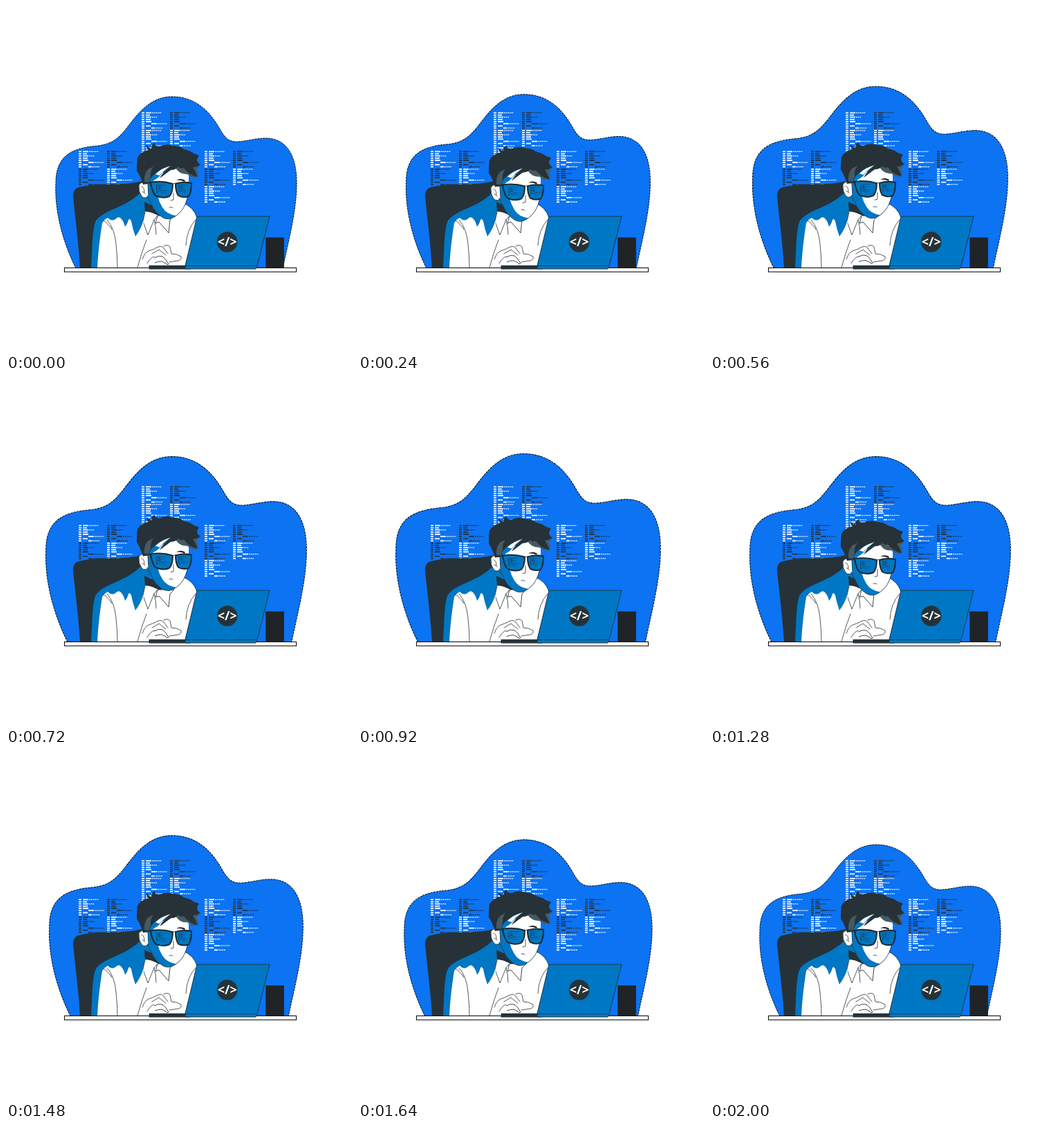
An HTML page for the animation above (2.04 s loop, 500 by 500 pixels).

```html
<!DOCTYPE html>
<html lang="en">
<head>
<meta charset="utf-8">
<title>Developer at work</title>
<style>
html, body { margin: 0; width: 100%; height: 100%; overflow: hidden; background: #fff; }
svg { display: block; width: 100%; height: 100%; }
.dark { fill: #263238; }
.grey { fill: #455a64; }
.blue { fill: #0077c4; }
.white { fill: #fff; }
.line { fill: none; stroke: #263238; stroke-width: .8; stroke-linecap: round; stroke-linejoin: round; }
.edge { stroke: #263238; stroke-width: .9; stroke-linejoin: round; }
.lens { stroke: #1d292f; stroke-width: 2; stroke-linejoin: round; }
text { font: 700 18px "Open Sans", "Noto Sans", sans-serif; fill: #fff; text-anchor: middle; }
</style>
</head>
<body>
<svg viewBox="0 0 500 500">
  <path id="blob" fill="#0c73f2" stroke="#06152c" stroke-dasharray="3 1" d="M101 379
    C84 345 70 300 72 256 C72 217 94 205 133 202 C155 199 163 190 174 177
    C190 156 208 131 240 131 C272 131 293 150 308 176 C316 190 321 197 336 196
    C350 195 362 191 375 191 C405 191 420 215 420 256 C420 296 408 340 400 379Z"/>
  <g id="code"></g>

  <!-- chair -->
  <path class="dark" d="M107 379C105 340 99 300 97 274Q97 263 107 261.5Q122 258 140 257.5Q180 258 196 253L202 290L150 379Z"/>

  <!-- shirt and its shade -->
  <path class="blue" d="M123 379C125 350 124 324 130 310C139 299 151 296 163 290Q182 282 194 270L206 275L210 292L200 379Z"/>
  <path class="white" d="M132 379C133 357 136 332 139 314Q141 309 147 306Q153 312 158 308
    Q162 304 165 306Q170 310 172 319Q175 316 177 309Q179 306 181 311Q183 322 187 333
    Q195 322 198 312L202 297L256 285Q270 290 276 306L258 379Z"/>
  <path class="line" d="M256 285Q271 290 276 306L259 375"/>
  <path class="line" d="M146 309Q157 321 159 344Q161 363 161 378M141 310Q150 317 153 323M274 309Q261 323 260 346M203 338Q196 356 190 378"/>

  <!-- neck and collar -->
  <path class="dark" d="M200 283L228 296L224 305Q212 298 201 298Z"/>
  <path class="white" d="M201 297L198 311L205 331L214 309L219 303Q210 297 201 297Z"/>
  <path class="line" d="M201 298L198 311M199 314L205 331L214 309L219 303"/>
  <path class="white edge" d="M219 303L216 314L221 312L235 328L237 309L243 303Z" stroke-width=".6"/>
  <path class="line" d="M214 309Q217 319 217 330"/>

  <g id="head">
    <path class="blue" d="M203 248L212 232L258 226L262 278Q255 298 243 305Q235 310 227 306Q214 298 210 286L204 274Z"/>
    <path class="white edge" d="M205 257Q195 252 192 259Q191 268 196 275Q201 280 206 274Z"/>
    <path class="line" d="M196 261Q200 262 200 269M197 268L201 271"/>
    <path class="white" d="M226 241Q235 240 245 233L264 242L264 265Q261 287 253 296L246 303Q232 301 226 291Q221 283 219 274L211 268L210 253Q219 251 226 241Z"/>
    <path class="line" d="M204 274L210 286Q214 298 227 306Q235 310 243 305C255 298 260 287 263 274"/>

    <!-- hair -->
    <path class="grey" d="M258 228L281 230L275 236Q279 240 277 247Q269 249 262 243Q250 244 244 232Z"/>
    <path class="dark" d="M198 258Q194 245 189 238Q189 226 190 219Q194 211 206 208Q202 204 203 201
      Q207 206 211 206Q209 200 215 198Q214 203 222 203Q232 198 242 202Q251 202 257 207
      Q267 209 271 213L279 216Q276 220 276 223Q277 227 281 229Q276 233 270 233Q273 238 277 247
      Q265 245 257 234Q251 236 249 232Q246 237 238 237Q229 244 222 249
      Q226 241 235 234Q222 238 214 247L209 256Z"/>
    <path class="grey" d="M200 254Q199 243 205 236L213 232Q208 239 209 247L206 255Z"/>
    <path class="blue" d="M207 253Q213 240 229 235L217 248L211 255Z"/>
    <path class="white" d="M216 243Q225 234 238 231Q227 238 222 245Z"/>
    <path d="M246 252Q252 248 259 252L258 254Q252 251 246 252Z" fill="#1c2529"/>

    <!-- sunglasses -->
    <path class="line" d="M202 257L210 255" stroke-width="2"/>
    <path class="blue lens" d="M209 255Q225 252 241 257Q241 270 236 275Q226 279 216 274Q211 269 209 255Z"/>
    <path class="blue lens" d="M245 257Q256 253 268 256Q268 269 264 275Q256 278 249 274Q245 268 245 257Z"/>
    <path class="line" d="M208 255Q225 252 241 257Q244 255 268 256" stroke-width="2.2"/>
    <g id="lens"></g>
    <path class="line" d="M242 270L242 280L238 281M236 291Q239 290 241 291.5"/>
  </g>

  <!-- cup, desk, laptop -->
  <rect x="375.3" y="334.5" width="26.5" height="44" fill="#212426"/>
  <rect x="84.5" y="378.4" width="335" height="5.8" fill="#fff" stroke="#111" stroke-width="1.1"/>
  <rect class="dark" x="206.5" y="374.8" width="60" height="5.7"/>
  <path class="blue edge" d="M276 304H381L363 375.5L361 380H259V376Z" stroke-width="1.3"/>
  <path class="line" d="M259 375.5H363" stroke-width="1.3"/>
  <circle class="dark" cx="319.7" cy="341" r="14.7"/>
  <text x="319.7" y="347.3">&lt;/&gt;</text>

  <!-- hand -->
  <path class="white" d="M197 366L204 354L228 346L238 349L240 358L253 362L252 368L236 371L204 374Z"/>
  <path class="line" d="M197 366Q200 357 206 354Q213 352 220 348Q225 346 228 350L234 358M228 347Q234 344 237 348L239 358
    Q247 358 253 362Q254 367 249 368L236 370M211 358L221 352L231 360M204 372Q208 364 214 362"/>
  <path id="finger" class="white edge" d="M214 364Q221 360 226 362Q231 365 235 373Q233 375 231 372L225 369Q219 369 215 371" stroke-width=".7"/>
</svg>
<script>
const $ = id => document.getElementById(id);

// Rows of a listing: tick end, word start, word end, dotted tail end
const rows = [
  [4, 6, 14, 29], [4, 6, 12, 0], [4, 6, 14, 23], [4, 6, 13, 0],
  [4, 6, 14, 0], [4, 14, 22, 37], [4, 6, 13, 0], [4, 14, 19, 30]
];

function listing(x, y, color, scale = 1) {
  let bars = '', dots = '';
  rows.forEach(([tick, from, to, tail], i) => {
    const at = 1.4 + i * 3.15;
    bars += `M0 ${at}H${tick}M${from} ${at}H${to}`;
    if (tail) dots += `M${to + 1} ${at}H${tail}`;
  });
  return `<g transform="translate(${x} ${y}) scale(${scale})" stroke="${color}">
    <path d="${bars}" stroke-width="1.8"/>
    <path d="${dots}" stroke-width="1.3" stroke-dasharray="1.8 .9"/></g>`;
}

// Each letter is a block: w = white, d = dark, read two per line
function cluster(x, y, kinds) {
  return [...kinds].map((kind, i) => listing(
    x + i % 2 * 41, y + (i >> 1) * 25.4, kind === 'w' ? '#f4f8ff' : '#26364a'
  )).join('');
}

$('code').innerHTML = cluster(105, 209, 'wddw') + cluster(196, 153, 'wdwww') + cluster(287, 209, 'wddww');
$('lens').innerHTML = listing(217, 258, '#173f60', .5) + listing(249, 258, '#173f60', .46);

const FRAME = 40, LOOP = 2040, CYCLE = 2000;
const triangle = p => 2 / Math.PI * Math.asin(Math.sin(2 * Math.PI * p));

function draw(now) {
  const p = Math.floor(now % LOOP / FRAME) * FRAME / CYCLE;
  const grow = 1 + .05 * (1 - Math.cos(2 * Math.PI * p));
  $('blob').setAttribute('transform', `translate(246 380) scale(${grow}) translate(-246 -380)`);
  $('head').setAttribute('transform', `translate(0 ${3.7 * triangle(2 * p)})`);
  $('finger').setAttribute('transform', `translate(0 ${-1.5 * Math.max(0, Math.sin(2 * Math.PI * p))})`);
}

const start = performance.now();
function tick() {
  draw(performance.now() - start);
  requestAnimationFrame(tick);
}
tick();
</script>
</body>
</html>
```
